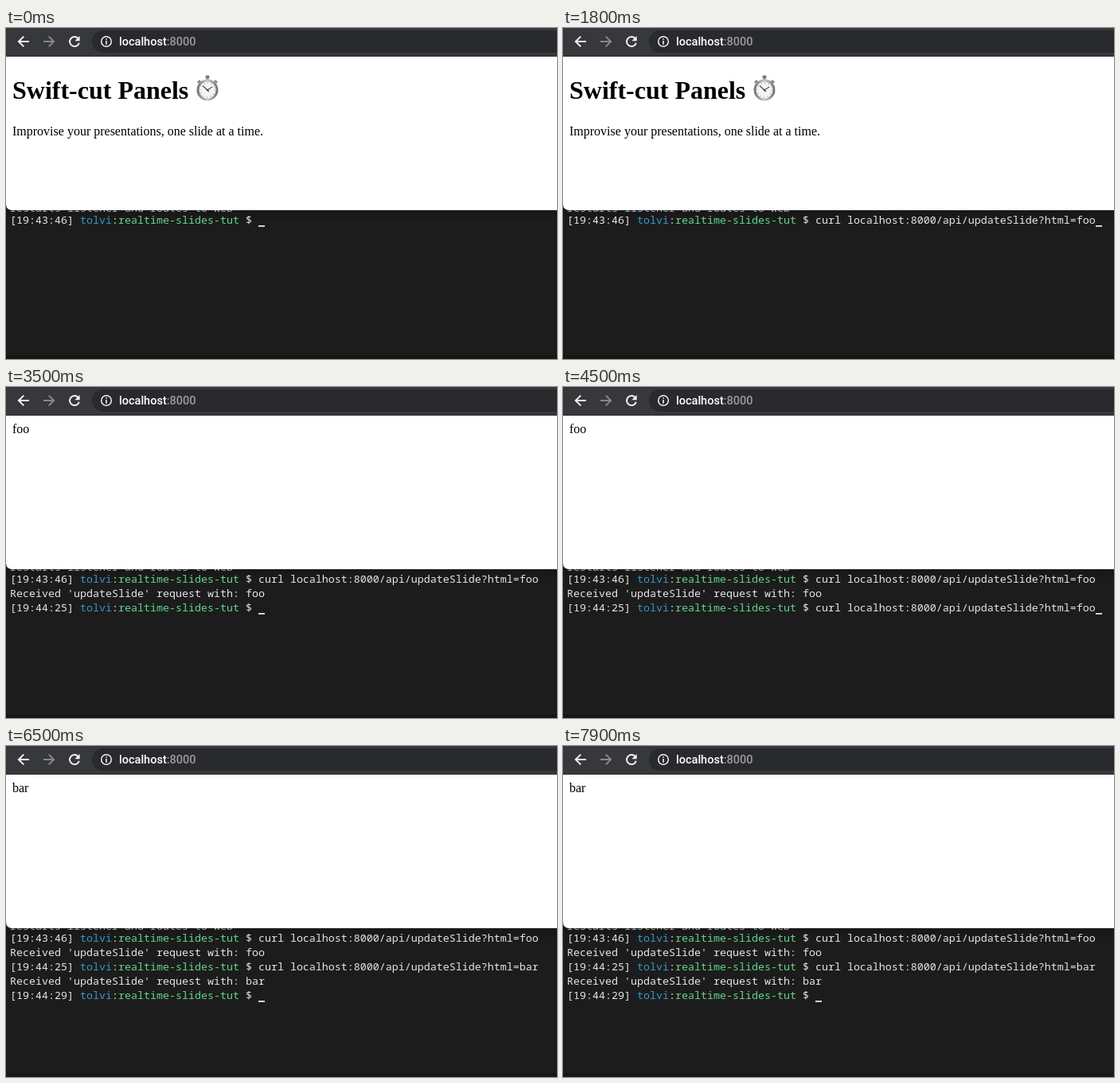
These frames come from a looping animation (692 by 416 pixels, 8000 ms). An HTML page:

```html
<!DOCTYPE html>
<html lang="en">
<head>
<meta charset="utf-8">
<style>
html, body { margin: 0; width: 100%; height: 100%; overflow: hidden; background: #1c1c1c; }
svg { display: block; }
text { white-space: pre; }
.term { font: 500 13.333px "Noto Sans Mono", monospace; fill: #e6e6e6; }
.user { fill: #3b93cb; }
.path { fill: #62d58c; }
.page { font: 16px "Liberation Serif", serif; fill: #000; }
.page .title { font-size: 32px; font-weight: bold; }
.url { font: 500 14.5px Roboto, sans-serif; fill: #fff; }
.icon { fill: none; stroke: #f1f1f2; stroke-width: 2; }
</style>
</head>
<body>
<svg width="692" height="416" viewBox="0 0 692 416">
  <defs>
    <linearGradient id="shade" x2="0" y2="1">
      <stop stop-color="#141414"/><stop offset="1" stop-color="#1c1c1c"/>
    </linearGradient>
    <linearGradient id="metal">
      <stop stop-color="#777"/><stop offset=".5" stop-color="#ccc"/><stop offset="1" stop-color="#777"/>
    </linearGradient>
  </defs>

  <!-- terminal -->
  <rect width="692" height="416" fill="#1c1c1c"/>
  <rect y="220" width="692" height="24" fill="url(#shade)"/>
  <rect y="411" width="692" height="5" fill="#171717"/>
  <g class="term">
    <text x="5" y="231" fill="#aaa">restarts listener and routes to web</text>
    <g id="rows"></g>
    <rect id="cursor" width="8" height="1.8"/>
  </g>

  <!-- browser -->
  <path d="M0 36H692V229H8Q0 229 0 221Z" fill="#fff"/>
  <rect width="692" height="36" fill="#37383c"/>
  <rect x="108" y="3" width="620" height="28" rx="14" fill="#292a2d"/>
  <rect y="35" width="692" height="1" fill="#2b2c2f"/>
  <g class="icon">
    <path id="arrow" d="M29 17H16M22.3 10.6L15.9 17L22.3 23.4"/>
    <path d="M47 17H60M53.7 10.6L60.1 17L53.7 23.4" stroke="#86878a"/>
    <path d="M90.6 13.2A6 6 0 1 0 91.8 18.7"/>
    <path d="M92.6 10V16.2H86.4Z" fill="#f1f1f2" stroke="none"/>
    <circle cx="126" cy="17" r="6.3" stroke-width="1.5"/>
    <path d="M126 16V20.7M126 13.2V14.8" stroke-width="1.6"/>
  </g>
  <text class="url" x="142" y="22">localhost<tspan fill="#9b9ca0">:8000</tspan></text>

  <g class="page">
    <g id="intro">
      <text class="title" x="8" y="89">Swift-cut Panels</text>
      <text x="8" y="135">Improvise your presentations, one slide at a time.</text>
      <!-- stopwatch -->
      <rect x="250.5" y="59.5" width="5" height="4" rx="1.5" fill="#777"/>
      <path d="M253 62V67M262 66L265 69M244 66L241 69" stroke="#888" stroke-width="3"/>
      <circle cx="253" cy="78" r="12" fill="#f4f4f2" stroke="url(#metal)" stroke-width="3"/>
      <circle cx="253" cy="78" r="9" fill="none" stroke="#999" stroke-width="1.6" stroke-dasharray=".8 3.912"/>
      <path d="M255 80L247 72.5M253 78L259 74" stroke="#444" stroke-width="1.1"/>
      <circle cx="253" cy="78" r="1.3" fill="#444"/>
    </g>
    <text id="slide" x="8" y="58"></text>
  </g>
</svg>
<script>
const LOOP = 8000, CHAR = 8, LEFT = 5, BASE = 246, LEADING = 18;
const RECALL = 1300, ENTER_FOO = 2400, REPLY_FOO = 2800;
const ENTER_BAR = 6200, REPLY_BAR = 6400;
const CURL = 'curl localhost:8000/api/updateSlide?html=';
const EDITS = [[0, ''], [4000, CURL + 'foo'], [4700, CURL + 'fo'], [4900, CURL + 'f'], [5100, CURL],
  [5600, CURL + 'b'], [5800, CURL + 'ba'], [5950, CURL + 'bar']];

const el = id => document.getElementById(id);
const prompt = (time, cmd) => [[`[${time}] `], ['tolvi', 'user'], [':'],
  ['realtime-slides-tut', 'path'], [' $ ' + cmd]];
const reply = word => [[`Received 'updateSlide' request with: ${word}`]];
const blank = [['']];

function rowsAt(t) {
  const rows = [prompt('19:43:46', t < RECALL ? '' : CURL + 'foo')];
  if (t < ENTER_FOO) return rows;
  if (t < REPLY_FOO) return [...rows, blank];
  const cmd = EDITS.filter(([at]) => t >= at).pop()[1];
  rows.push(reply('foo'), prompt('19:44:25', cmd));
  if (t < ENTER_BAR) return rows;
  if (t < REPLY_BAR) return [...rows, blank];
  return [...rows, reply('bar'), prompt('19:44:29', '')];
}

let shown = '';
function draw(t) {
  const rows = rowsAt(t);
  const markup = rows.map((row, i) => `<text x="${LEFT}" y="${BASE + i * LEADING}">` +
    row.map(([s, cls = '']) => `<tspan class="${cls}">${s}</tspan>`).join('') + '</text>').join('');
  if (markup === shown) return;
  shown = markup;
  el('rows').innerHTML = markup;
  const last = rows.length - 1;
  const length = rows[last].reduce((n, [s]) => n + s.length, 0);
  el('cursor').setAttribute('x', LEFT + length * CHAR);
  el('cursor').setAttribute('y', BASE + last * LEADING + 2);
  el('intro').style.display = t < ENTER_FOO ? '' : 'none';
  el('slide').textContent = t < ENTER_FOO ? '' : t < ENTER_BAR ? 'foo' : 'bar';
}

const start = performance.now();
function tick() {
  draw((performance.now() - start) % LOOP);
  requestAnimationFrame(tick);
}
tick();
</script>
</body>
</html>
```
